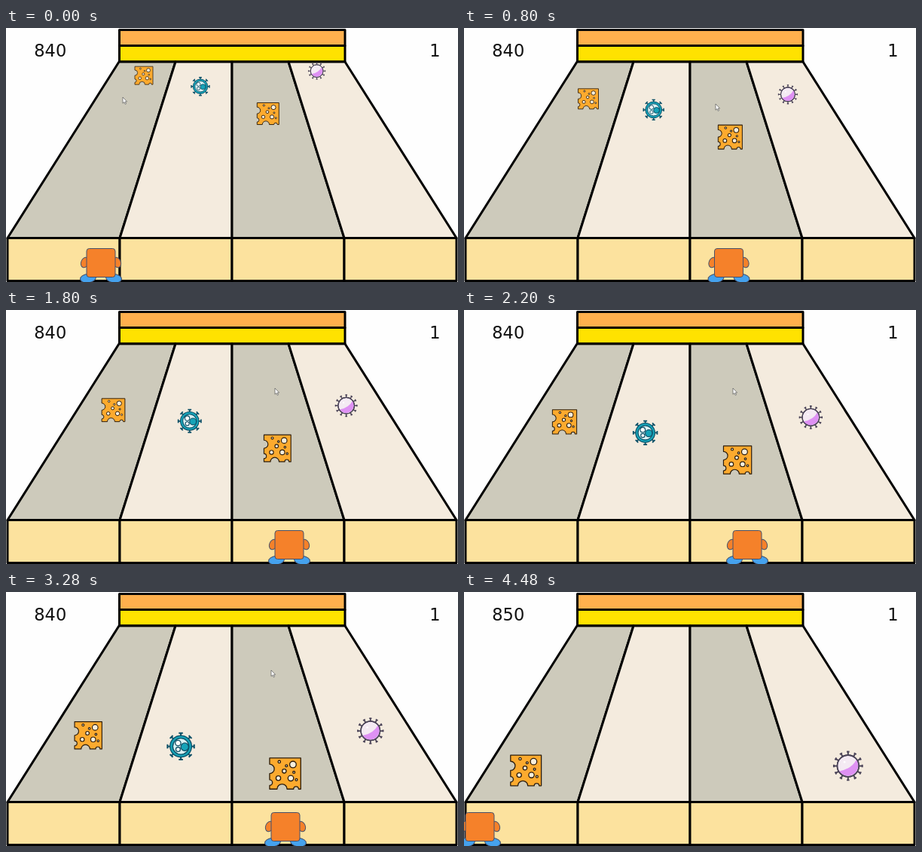
An HTML page for the animation above (4.52 s loop, 600x338 px).

```html
<!DOCTYPE html>
<html lang="en">
<head>
<meta charset="utf-8">
<title>Cheese catcher</title>
<style>
  html, body { margin: 0; width: 100%; height: 100%; overflow: hidden; background: #fefefe; }
  svg { display: block; width: 100%; height: 100%; }
  text { font: 22.5px "DejaVu Sans", sans-serif; fill: #111; }
  .ink { stroke: #000; stroke-width: 3; stroke-linejoin: round; }
</style>
</head>
<body>
<svg viewBox="0 0 600 338">
  <defs>
    <!-- Items are one unit wide, centred on the origin -->
    <g id="cheese" stroke="#2b1c0c" stroke-width=".032">
      <path fill="#fcaa2e" stroke-linejoin="round" d="M-.5-.5H.5V.5H.43A.08 .08 0 0 0 .27 .5H.06A.16 .16 0 0 0-.26 .5H-.5V.38A.09 .09 0 0 0-.5 .2V0A.15 .15 0 0 0-.5-.3Z"/>
      <g fill="#f8efdc">
        <circle cx=".25" cy="-.29" r=".105"/>
        <circle cx=".18" cy=".15" r=".09"/>
        <circle cx="-.22" cy=".15" r=".075"/>
        <circle cx="-.03" cy="-.08" r=".065"/>
        <circle cx="-.19" cy="-.38" r=".04"/>
        <circle cx=".04" cy="-.25" r=".035"/>
        <circle cx=".36" cy=".2" r=".035"/>
        <circle cx=".28" cy="-.04" r=".035"/>
      </g>
    </g>
    <g id="teal" stroke="#0c4f66" stroke-width=".035">
      <g class="spikes" data-count="8" data-cap=".075" stroke-width=".055"></g>
      <circle r=".39" fill="#16a3b8"/>
      <circle r=".29" fill="#d9f1f3"/>
      <circle cx=".14" cy=".02" r=".14" fill="#16a3b8"/>
      <circle cx="-.1" cy="-.12" r=".1" fill="#fff"/>
      <circle cx="-.1" cy=".11" r=".08" fill="#fff"/>
    </g>
    <g id="pink" stroke="#4a4357" stroke-width=".04">
      <g class="spikes" data-count="12" data-cap=".045" stroke-width=".05"></g>
      <circle r=".365" fill="#f4eaf3"/>
      <path d="M-.3 .18Q.12 .1 .28-.21A.345 .345 0 0 1-.3 .18Z" fill="#de91f3" stroke="none"/>
      <circle cx="-.12" cy="-.13" r=".035" fill="#fff" stroke="none"/>
      <circle r=".365" fill="none"/>
    </g>
  </defs>

  <g id="board" class="ink">
    <rect x="150.5" y="2.5" width="299.5" height="21" fill="#ffb04d"/>
    <rect x="150.5" y="23.5" width="299.5" height="21.5" fill="#ffe200"/>
  </g>
  <text id="score" x="37.3" y="38">840</text>
  <text x="562.3" y="38">1</text>
  <g id="items"></g>

  <g id="player" stroke="#46506a" stroke-width="1">
    <g fill="#45a2ee">
      <ellipse cx="-17" cy="333" rx="10.5" ry="5.8" transform="rotate(-8 -17 333)"/>
      <ellipse cx="17" cy="333" rx="10.5" ry="5.8" transform="rotate(8 17 333)"/>
    </g>
    <g fill="#f5812a">
      <ellipse cx="-21.3" cy="312" rx="5" ry="7" transform="rotate(22 -21.3 312)"/>
      <ellipse cx="21.3" cy="312" rx="5" ry="7" transform="rotate(-22 21.3 312)"/>
      <rect x="-19" y="293.5" width="38" height="38" rx="3.5"/>
    </g>
  </g>
  <path id="cursor" d="M0 0V8.2L1.9 6.5L3.2 9.4L4.5 8.8L3.2 6H5.6Z" fill="#fff" stroke="#555" stroke-width=".7"/>
</svg>

<script>
const LOOP = 4520, STEP = 40, CAUGHT = 3440;
const $ = id => document.getElementById(id);

function add(parent, tag, attrs) {
  const el = document.createElementNS("http://www.w3.org/2000/svg", tag);
  for (const key in attrs) el.setAttribute(key, attrs[key]);
  return parent.appendChild(el);
}

// Four lanes in perspective, each with a box at its near end
for (let i = 0; i < 4; i++) {
  const top = 150 + 75 * i, low = 2 + 149 * i;
  add($("board"), "path", {
    d: `M${top} 45H${top + 75}L${low + 149} 279.5H${low}Z`,
    fill: i % 2 ? "#f4ebde" : "#cdcabb"
  });
  add($("board"), "rect", { x: low, y: 279.5, width: 149, height: 57, fill: "#fce29e" });
}

for (const ring of document.querySelectorAll(".spikes")) {
  const { count, cap } = ring.dataset;
  for (let i = 0; i < count; i++)
    add(ring, "path", {
      d: `M0-.36V-.48M-${cap}-.48H${cap}`,
      transform: `rotate(${360 / count * i})`
    });
}

// Start place and size, with speeds per second
const items = [
  { kind: "cheese", x: 183, y: 63.2, size: 24, vx: -22.5, grow: 3.75, end: LOOP },
  { kind: "teal", x: 258, y: 77.8, size: 25, vx: -7.9, grow: 3.6, end: 4320 },
  { kind: "cheese", x: 347.8, y: 114, size: 29, vx: 6.95, grow: 3.75, end: CAUGHT },
  { kind: "pink", x: 412.6, y: 57.2, size: 23, vx: 21.7, grow: 3.65, end: LOOP }
];
const FALL = 38.9;
for (const item of items) item.el = add($("items"), "use", { href: "#" + item.kind });

// Pointer track: time, x, y
const track = [
  [-80, 107, 91], [0, 155, 92], [160, 238, 95], [320, 304, 99], [480, 328, 101],
  [800, 334, 101], [1160, 357, 104], [2760, 357, 104], [3160, 352, 104],
  [3480, 352, 104], [3640, 250, 102], [3840, -20, 100]
];

function pointer(t) {
  const i = track.findIndex(k => k[0] > t);
  if (i < 0) return track[track.length - 1].slice(1);
  const a = track[Math.max(i - 1, 0)], b = track[i];
  const f = Math.max(0, (t - a[0]) / (b[0] - a[0]));
  return [a[1] + (b[1] - a[1]) * f, a[2] + (b[2] - a[2]) * f];
}

function draw(t) {
  const s = t / 1000;
  for (const { el, x, y, size, vx, grow, end } of items) {
    el.style.display = t < end ? "" : "none";
    el.setAttribute("transform",
      `translate(${x + vx * s} ${y + FALL * s}) scale(${size + grow * s})`);
  }
  $("score").textContent = t < CAUGHT ? "840" : "850";
  $("cursor").setAttribute("transform", `translate(${pointer(t)})`);
  // The player trails the pointer and stops at the left edge
  const px = Math.max(21, pointer(t - 80)[0] + 19);
  $("player").setAttribute("transform", `translate(${px} 0)`);
}

const start = performance.now();
function tick() {
  const t = (performance.now() - start) % LOOP;
  draw(Math.floor(t / STEP) * STEP);
  requestAnimationFrame(tick);
}
draw(0);
requestAnimationFrame(tick);
</script>
</body>
</html>
```
